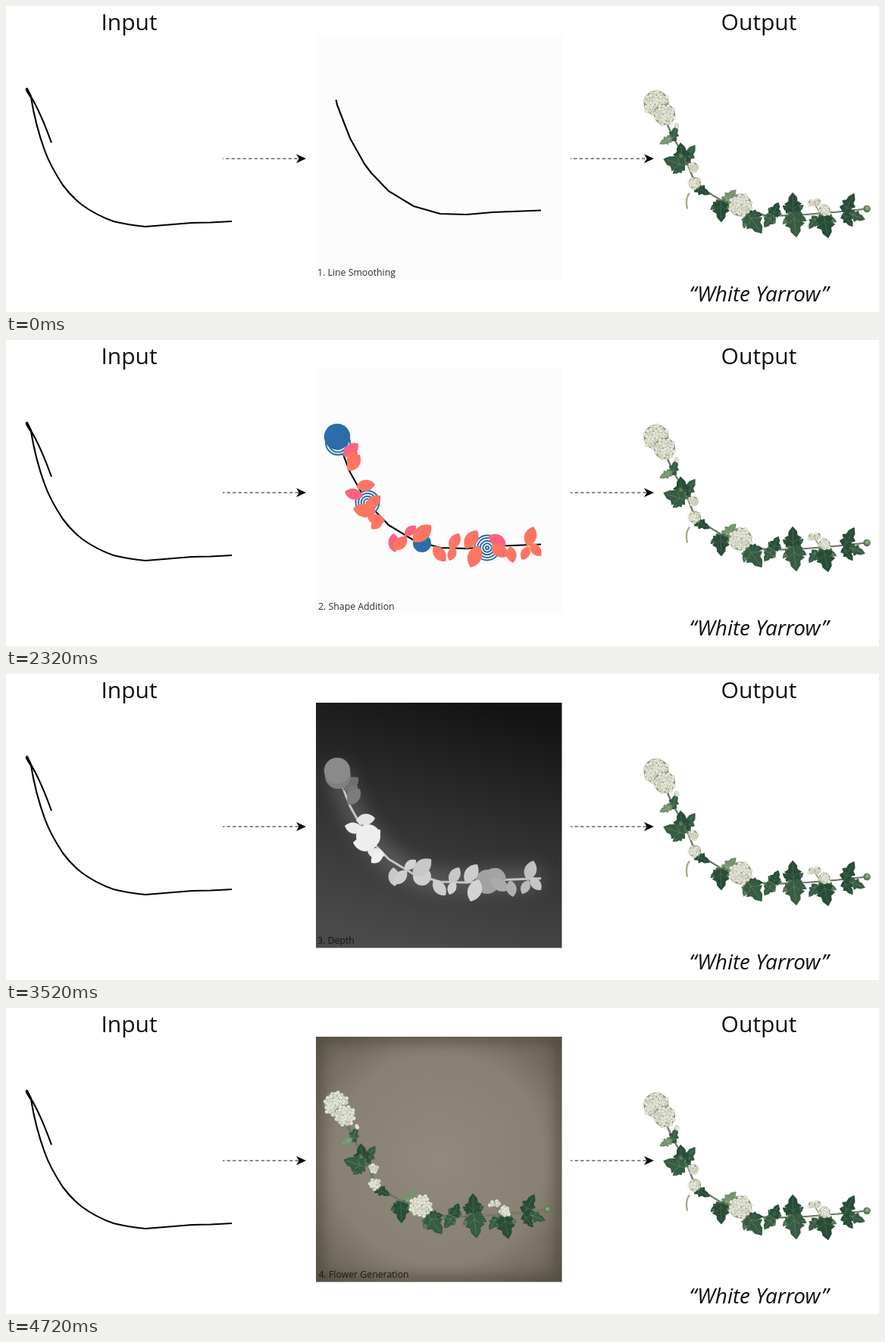
An HTML page for the animation above (4.8 s loop, 1152x405 px).

```html
<!DOCTYPE html>
<html lang="en">
<head>
<meta charset="utf-8">
<title>From line to flower</title>
<style>
html, body { margin: 0; width: 100%; height: 100%; overflow: hidden; background: #fff; }
svg { display: block; width: 100vw; height: 100vh; }
text { font-family: "Open Sans", sans-serif; }
.head { font-size: 30px; text-anchor: middle; fill: #111; }
.name { font-size: 28px; font-style: italic; }
.note { font-size: 12.3px; }
.thin { vector-effect: non-scaling-stroke; stroke-linejoin: round; }
</style>
</head>
<body>
<svg id="stage" viewBox="0 0 1152 405">
  <defs>
    <linearGradient id="petalA"><stop stop-color="#ff7a5a"/><stop offset="1" stop-color="#f9706c"/></linearGradient>
    <linearGradient id="petalB"><stop stop-color="#fa6670"/><stop offset="1" stop-color="#f9628a"/></linearGradient>
    <linearGradient id="dark" x1=".65" y1="0" x2=".4" y2="1">
      <stop stop-color="#131313"/><stop offset=".5" stop-color="#313131"/><stop offset="1" stop-color="#4a4a4a"/>
    </linearGradient>
    <radialGradient id="paper" r=".72">
      <stop stop-color="#928a7d"/><stop offset=".6" stop-color="#888073"/><stop offset="1" stop-color="#5c554a"/>
    </radialGradient>
    <filter id="mottle" x="0" y="0" width="1" height="1">
      <feTurbulence type="fractalNoise" baseFrequency=".022" numOctaves="3" seed="4"/>
      <feColorMatrix values="0 0 0 0 .25  0 0 0 0 .22  0 0 0 0 .17  .7 0 0 0 -.25"/>
    </filter>
    <filter id="glow" x="-.2" y="-.4" width="1.4" height="1.8"><feGaussianBlur stdDeviation="13"/></filter>
    <filter id="soft"><feGaussianBlur stdDeviation="8"/></filter>
    <clipPath id="frame"><rect x="409" y="38" width="324.5" height="324.5"/></clipPath>
  </defs>
</svg>
<script>
const STAGE = document.getElementById('stage');
const STEP = 1200, LOOP = 4800, TICK = 80;
const DASH = 7.5, DASH_TIME = 400;
const curve = 'M435.5 124L437 131 454 175 473 209 482 221 505 245 538 265 573 275 608 276 642 273 706 270.5';

// Places a unit shape so that it runs from a base to a tip.
function place([x, y, tx, ty], ratio, turn = 0, size = 1) {
  const a = Math.atan2(ty - y, tx - x) * 180 / Math.PI + turn;
  const len = Math.hypot(tx - x, ty - y) * size;
  return `translate(${x} ${y}) rotate(${a.toFixed(1)}) scale(${len.toFixed(2)} ${(len * ratio).toFixed(2)})`;
}
const disc = (x, y, r, fill, extra = '') => `<circle cx="${x}" cy="${y}" r="${r}" fill="${fill}" ${extra}/>`;
const rect = (fill, extra = '') => `<rect x="409" y="38" width="324.5" height="324.5" fill="${fill}" ${extra}/>`;
const line = (d, color, w, extra = '') =>
  `<path d="${d}" fill="none" stroke="${color}" stroke-width="${w}" stroke-linejoin="round" ${extra}/>`;
const note = (x, s, fill = '#2b2b2b') => `<text class="note" x="${x}" y="357" fill="${fill}">${s}</text>`;

// base and tip of each petal
const petals = [
  [445, 154, 465, 137], [450, 161, 464, 148], [451, 173, 467, 152],
  [462, 194, 487, 191], [447, 201, 471, 207], [458, 223, 488, 228],
  [475, 223, 494, 206], [477, 235, 500, 240], [482, 250, 497, 236],
  [513, 281, 511, 256], [512, 278, 529, 260], [526, 259, 541, 246],
  [537, 267, 561, 245], [564, 273, 580, 293], [592, 274, 585, 292],
  [586, 277, 598, 256], [606, 276, 622, 252], [624, 272, 613, 301],
  [637, 259, 660, 272], [640, 272, 663, 286], [665, 273, 669, 295],
  [690, 273, 681, 291], [688, 273, 696, 247], [692, 269, 706, 286]
];
const petalShape = 'M0 0C.25 -.62 .72 -.66 1 0C.72 .66 .25 .62 0 0Z';
const petal = (p, fill) => `<path d="${petalShape}" transform="${place(p, .62)}" fill="${fill}"/>`;

function rings(x, y, r) {
  let s = disc(x, y, r, '#fcfcfc');
  for (let k = r - 1; k > 1; k -= 3.6) s += disc(x, y, k.toFixed(1), 'none', 'stroke="#2a6da9" stroke-width="2"');
  return s;
}

function linePanel() {
  return rect('#fcfcfc') + line(curve, '#000', 2.1) + note(411, '1. Line Smoothing');
}

function shapePanel() {
  const blue = '#2a6da9';
  return rect('#fcfcfc') + line(curve, '#000', 2.1)
    + rings(438, 136, 17) + rings(477, 215, 16.5) + rings(635, 275, 17.5) + disc(549, 269, 12, blue)
    + petals.map((p, i) => petal(p, i % 9 === 0 || i % 7 === 4 ? 'url(#petalB)' : 'url(#petalA)')).join('')
    + disc(437, 128, 17.3, blue) + note(412, '2. Shape Addition');
}

function depthPanel() {
  const tone = (x, i) => {
    const v = (i < 3 ? 112 : x < 500 ? 228 : x < 625 ? 199 : x < 675 ? 164 : 186) + i % 3 * 6;
    return `rgb(${v},${v},${v})`;
  };
  return rect('url(#dark)')
    + `<g clip-path="url(#frame)">${line(curve, '#888', 24, 'filter="url(#glow)" opacity=".5"')}</g>`
    + line(curve, '#c4c4c4', 3)
    + disc(635, 275, 16, '#a2a2a2') + disc(549, 268, 12, '#cfcfcf')
    + petals.map((p, i) => petal(p, tone(p[0], i))).join('')
    + disc(478, 215, 16, '#eee')
    + disc(438, 135, 17, '#808080') + disc(437, 128, 17.3, '#8a8a8a')
    + note(411, '3. Depth', '#151515');
}

// base and tip of each leaf; sprigs carry two smaller side leaves
const sprigs = [
  [471, 207, 468, 180], [473, 210, 446, 201], [521, 257, 522, 284], [557, 274, 575, 299],
  [590, 276, 597, 259], [589, 276, 579, 291], [617, 273, 616, 246], [617, 273, 621, 304],
  [657, 276, 663, 305]
];
const singles = [
  [456, 177, 463, 158], [456, 173, 441, 181], [472, 205, 487, 183], [487, 237, 506, 248],
  [525, 259, 541, 242], [648, 277, 638, 293], [684, 272, 697, 247], [690, 273, 711, 281],
  [683, 273, 695, 290]
];
const greens = ['#294c38', '#375b43', '#517351', '#75906d'];
const veins = ['#547a5b', '#6f9270', '#8ba582', '#a3b596'];
const edge = [[.05, .2], [.16, .48], [.34, .3], [.47, .52], [.58, .27], [.77, .25]];
const leafShape = `M0 0L${edge.join(' ')} 1 0 ${edge.map(([x, y]) => [x, -y]).reverse().join(' ')}Z`;

const leaf = (l, k, ratio, turn, size) => `<g transform="${place(l, ratio, turn, size)}">`
  + `<path class="thin" d="${leafShape}" fill="${greens[k]}" stroke="${greens[k]}" stroke-width="1.2"/>`
  + `<path class="thin" d="M0 0H.85M.2 0L.4 .3M.2 0L.4 -.3" fill="none" stroke="${veins[k]}" stroke-width=".6"/></g>`;
const sprig = (l, i) => leaf(l, 1 + i % 2, .6, 52, .62) + leaf(l, i % 3, .6, -52, .62) + leaf(l, i % 2, .76);

let seed;
const rnd = () => (seed = seed * 16807 % 2147483647) / 2147483647;

// A ball of small blossoms laid out along a golden spiral.
function blooms(x, y, r) {
  let s = disc(x, y, r - 1, '#8b927e');
  const n = Math.round(r * r / 6.5);
  for (let i = 0; i < n; i++) {
    const d = (r - 1.8) * Math.sqrt((n - i - .5) / n), a = i * 2.4 + x;
    const cx = (x + d * Math.cos(a) + rnd() - .5).toFixed(1), cy = (y + d * Math.sin(a) + rnd() - .5).toFixed(1);
    s += disc(cx, cy, 2.5, rnd() < .7 ? '#f0f0e4' : '#dfe1cf', 'stroke="#90977f" stroke-width=".35"')
      + disc(cx, cy, .5, '#9ba080');
  }
  return s;
}

function plant() {
  seed = 7;
  const stem = 'M450 153Q454 164 461 177L475 201 486 230Q503 246 528 259T562 273Q590 278 640 274T712 267';
  return line(stem, '#4d5b48', 2.2) + line(stem, '#a3a892', .7)
    + line('M654 275L645 261', '#647553', 1.2)
    + singles.map((l, i) => leaf(l, [1, 3, 1, 0, 3][i] ?? i % 2, .62)).join('')
    + sprigs.map(sprig).join('')
    + blooms(436, 127, 17.5) + blooms(447, 142, 15) + blooms(463, 158, 3.8)
    + blooms(485, 212, 7.5) + blooms(487, 233, 9) + blooms(547, 262, 16)
    + blooms(641, 259, 5) + blooms(649, 258, 5) + blooms(658, 269, 8.5)
    + disc(714, 267, 4.8, '#5f7c56') + disc(714.5, 266, 2.5, '#91a47e');
}

function flowerPanel() {
  const rim = rect('none', 'stroke="#443d33" stroke-width="16" opacity=".5" filter="url(#soft)"');
  return rect('url(#paper)') + rect('#000', 'filter="url(#mottle)" opacity=".5"')
    + `<g clip-path="url(#frame)">${rim}</g>` + plant() + note(412.5, '4. Flower Generation', '#1b1916');
}

const arrow = x => `<g transform="translate(${x} 202)">`
  + '<path class="dash" d="M0 0H100" stroke="#1c1c1c" stroke-width="1.2" stroke-dasharray="4.5 3"/>'
  + '<path d="M110 0L97 -6 100.5 0 97 6Z" fill="#0a0a0a"/></g>';

const scribble = 'M60 181Q46 142 33 120L28 109.5Q25 109 29 115L33 121Q39 158 51 191Q58 211 75 237'
  + 'Q87 253 100 263Q119 277 142 285Q162 290 184 292L245 287 270 286.5 298 285';

STAGE.insertAdjacentHTML('beforeend',
  '<text class="head" x="162.5" y="32">Input</text><text class="head" x="993.5" y="32">Output</text>'
  + '<text class="head name" x="993.5" y="391">“White Yarrow”</text>'
  + line(scribble, '#000', 2.1) + line('M27.5 110L32 119', '#000', 3.2, 'stroke-linecap="round"')
  + arrow(286) + arrow(745)
  + [linePanel, shapePanel, depthPanel, flowerPanel].map(f => `<g class="panel">${f()}</g>`).join('')
  + `<g transform="translate(422 1.5)">${line('M480 246Q474 253 477 267', '#a2ad92', 2.4)}${plant()}</g>`);

const panels = [...STAGE.querySelectorAll('.panel')];
const dashes = [...STAGE.querySelectorAll('.dash')];

function draw(ms) {
  const t = Math.floor(ms % LOOP / TICK) * TICK;
  const step = Math.floor(t / STEP);
  panels.forEach((p, i) => p.setAttribute('visibility', i === step ? 'visible' : 'hidden'));
  // The dashes run toward the left end of each line.
  const shift = t % DASH_TIME / DASH_TIME * DASH - 4;
  dashes.forEach(d => d.setAttribute('stroke-dashoffset', shift));
}

const start = performance.now();
function tick() {
  draw(performance.now() - start);
  requestAnimationFrame(tick);
}
draw(0);
requestAnimationFrame(tick);
</script>
</body>
</html>
```
